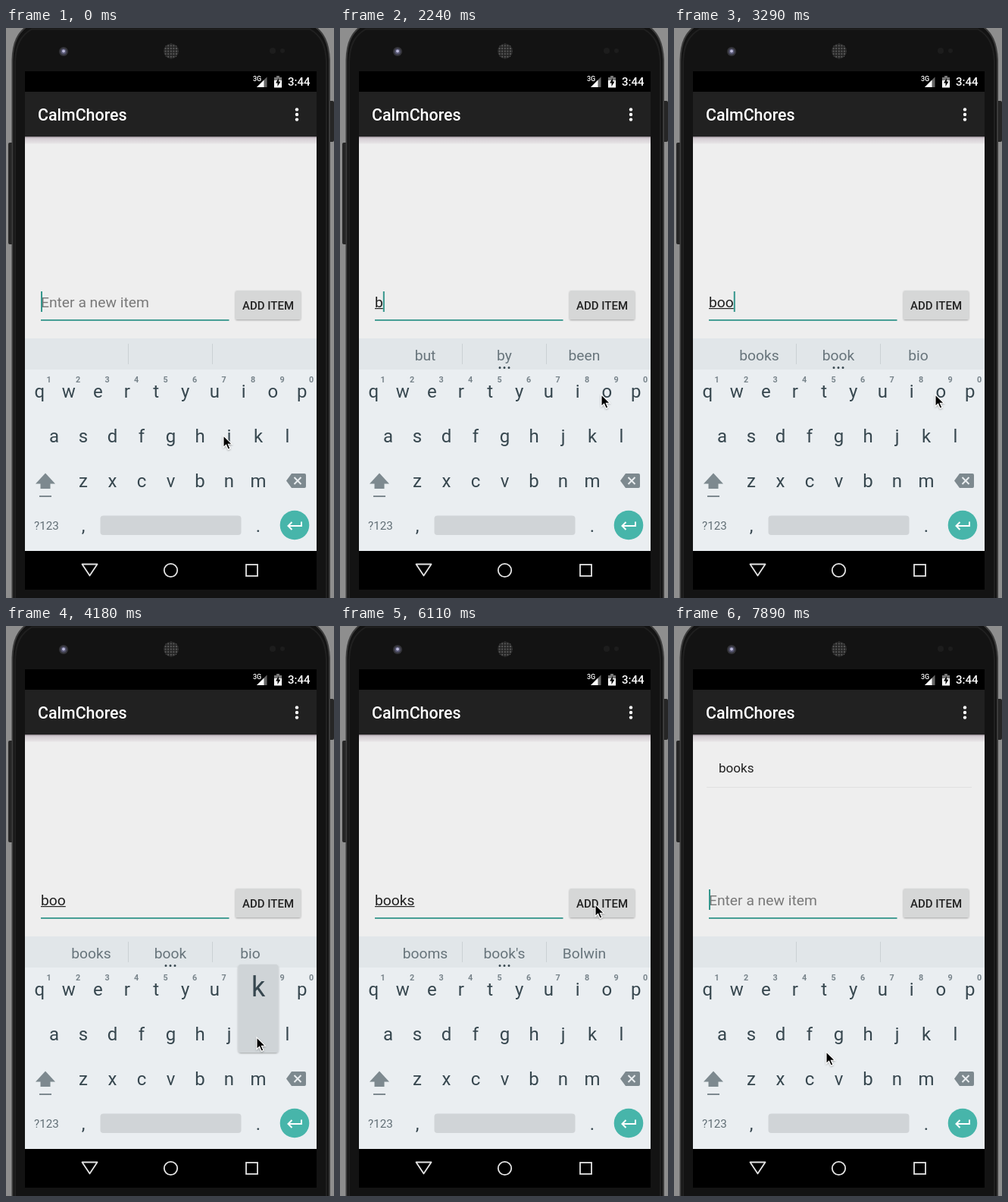
An HTML page that plays this animation: 433 by 751 pixels, repeating every 8 s.

```html
<!DOCTYPE html>
<html lang="en">
<head>
<meta charset="utf-8">
<title>To-do list</title>
<style>
  html, body { margin: 0; width: 100%; height: 100%; overflow: hidden; background: #8e8e8e; }
  svg { display: block; width: 433px; height: 751px; font-family: Roboto, sans-serif; }
  .medium { font-weight: 500; }
  .mid { text-anchor: middle; }
  .key { font-size: 24px; fill: #37474f; text-anchor: middle; }
  .digit { font-size: 10.8px; font-weight: 700; fill: #78848b; text-anchor: middle; }
  .word { font-size: 19.25px; fill: #67747b; text-anchor: middle; }
  .field { font-size: 19.25px; }
</style>
</head>
<body>
<svg viewBox="0 0 433 751">
  <defs>
    <linearGradient id="barShadow" x2="0" y2="1">
      <stop offset="0" stop-color="#8d838a"/>
      <stop offset=".22" stop-color="#d3ccd2"/>
      <stop offset=".85" stop-color="#e5e2e4"/>
      <stop offset="1" stop-color="#eee"/>
    </linearGradient>
    <pattern id="mesh" width="3.6" height="3.6" patternUnits="userSpaceOnUse">
      <circle cx="1.8" cy="1.8" r="1.15" fill="#5b5b5b"/>
    </pattern>
    <filter id="soft" x="-20%" y="-20%" width="140%" height="150%">
      <feDropShadow dx="0" dy="1" stdDeviation=".8" flood-opacity=".32"/>
    </filter>
  </defs>

  <!-- device -->
  <rect width="433" height="751" fill="#8e8e8e"/>
  <rect x="3" y="151" width="7" height="134" rx="2" fill="#262626"/>
  <rect x="426" y="96" width="7" height="54" rx="2" fill="#262626"/>
  <path d="M8.500 760V42C9 20 15 6 30 -4H405C420 6 426 20 427 42V760Z" fill="#131313" stroke="#3b3b3b" stroke-width="2"/>
  <path d="M12 760V44C13 23 19 10 34 1.500H401C416 10 422 23 423 44V760" fill="none" stroke="#202020" stroke-width="2"/>
  <circle cx="76" cy="31" r="6" fill="#35353b"/>
  <circle cx="76" cy="31" r="3.800" fill="#55556f"/>
  <circle cx="76" cy="30.500" r="2" fill="#b9b8d8"/>
  <circle cx="218" cy="30.500" r="10" fill="#242424"/>
  <circle cx="218" cy="30.500" r="10" fill="url(#mesh)"/>
  <circle cx="352" cy="30" r="4" fill="#1d1d1d"/>
  <circle cx="365" cy="30" r="3" fill="#1d1d1d"/>

  <!-- status bar and title -->
  <rect x="25" y="57" width="385" height="683"/>
  <g fill="#fff">
    <text class="medium" x="326" y="70" font-size="9">3G</text>
    <path d="M331 78L344.500 64.500V78Z" fill="#666"/>
    <path d="M331 78L340.500 68.500V78Z"/>
    <path d="M354 65h3v-2h4v2h3v5h-10Z" fill="#777"/>
    <path d="M354 69h10v9.500h-10Z"/>
    <path d="M360 66l-4 6.500h2.500v4.500l4-6.500h-2.500Z" fill="#000"/>
    <text class="medium" x="372" y="76" font-size="15">3:44</text>
    <rect x="25" y="84" width="385" height="59" fill="#212121"/>
    <text class="medium" x="42" y="122" font-size="21.400">CalmChores</text>
    <circle cx="384" cy="107.400" r="2.200"/>
    <circle cx="384" cy="114" r="2.200"/>
    <circle cx="384" cy="120.600" r="2.200"/>
  </g>

  <!-- content -->
  <rect x="25" y="143" width="385" height="267" fill="#eee"/>
  <rect x="25" y="143" width="385" height="10" fill="url(#barShadow)"/>
  <g id="listItem">
    <text x="59" y="193" font-size="17.100" fill="#212121">books</text>
    <path d="M43 212.500H393" stroke="#e0e0e0"/>
  </g>
  <text id="hint" class="field" x="46" y="368" fill="#787878">Enter a new item</text>
  <text id="typed" class="field" x="46" y="368" fill="#212121"></text>
  <rect id="composing" x="46" y="369" height="1.200" fill="#212121"/>
  <rect id="caret" y="347" width="2" height="27" fill="#35968c"/>
  <rect x="46" y="384" width="248.500" height="1.800" fill="#35968c"/>
  <rect id="button" x="303" y="346" width="86" height="38" rx="2" filter="url(#soft)"/>
  <text class="medium mid" x="346" y="371" font-size="15" fill="#212121">ADD ITEM</text>

  <!-- keyboard -->
  <rect x="25" y="409" width="385" height="42" fill="#e1e6e9"/>
  <rect x="25" y="450" width="385" height="239" fill="#eaeef1"/>
  <path d="M161.500 416V443M272.500 416V443" stroke="#cbd1d4"/>
  <g id="words">
    <text class="word" x="112.500" y="438"></text>
    <text class="word" x="217" y="438"></text>
    <text class="word" x="322.500" y="438"></text>
    <path d="M211 447.500h0M217 447.500h0M223 447.500h0" stroke="#37474f" stroke-width="3" stroke-linecap="round"/>
  </g>
  <g id="keys"></g>
  <g fill="#7d898f">
    <path d="M52 586.500L65 600.500H58.500V607H45.500V600.500H39Z"/>
    <rect x="44" y="616" width="16" height="2"/>
    <path d="M377 587H394Q396 587 396 589V604Q396 606 394 606H377L370 596.500Z"/>
    <path d="M380.500 592l9 9m0-9l-9 9" stroke="#eaeef1" stroke-width="2"/>
  </g>
  <text class="mid" x="53.500" y="661" font-size="15.200" fill="#626f76">?123</text>
  <text class="key" x="102" y="664">,</text>
  <text class="key" x="333" y="664">.</text>
  <rect x="124.500" y="642.500" width="186" height="25.500" rx="4" fill="#d0d4d7"/>
  <circle cx="381" cy="655" r="19.300" fill="#47b5aa"/>
  <path d="M390 650.500V656H373M377.500 651L372.500 656L377.500 661" fill="none" stroke="#fff" stroke-width="2"/>
  <g fill="none" stroke="#e4e4e4" stroke-width="1.800">
    <path d="M100.500 706.500H120.500L110.500 721.500Z" stroke-linejoin="round"/>
    <circle cx="217.500" cy="714.500" r="8.700"/>
    <rect x="317" y="707" width="15" height="15"/>
  </g>

  <g id="popup">
    <rect x="-26.500" y="-100" width="53" height="116" rx="4" fill="#cfd4d7" filter="url(#soft)"/>
    <text class="key" y="-58.500" style="font-size:36px"></text>
  </g>
  <path id="pointer" d="M0 0V15.500L3.600 12.200L6.200 18.200L8.900 17L6.300 11.200H11.200Z" stroke="#fff" stroke-width="1.100" filter="url(#soft)"/>
</svg>
<script>
const LOOP = 8000, TICK = 148.86;
const $ = id => document.getElementById(id);

// Tables below are keyed by tick.
const typing = [[0, ""], [8, "b"], [17, "bo"], [22, "boo"], [29, "book"], [36, "books"], [44, ""]];
const suggestions = [
  [0, ""], [9, "but by been"], [17, "boy bo box"], [22, "books book bio"],
  [30, "boom books boon"], [36, "booms book's Bolwin"], [44, ""]
];
const presses = [
  [0, ""], [7, "b"], [9, ""], [16, "o"], [17, ""], [21, "o"], [22, ""],
  [28, "k"], [30, ""], [35, "s"], [36, ""]
];
const buttonColors = [[0, "#d6d7d7"], [43, "#bfc0c0"], [44, "#c7c8c8"], [45, "#cfd0d0"], [46, "#d6d7d7"]];
const pointerPath = [
  [0, 287, 537], [4, 304, 612], [7, 253, 601], [9, 253, 601], [13, 345, 483],
  [22, 345, 483], [28, 331, 542], [30, 331, 542], [33, 99, 539], [36, 99, 539],
  [41, 337, 367], [47, 337, 367], [49, 206, 525], [50, 206, 525], [51, 203, 583], [53, 201, 561]
];

const keys = {};
function addText(cls, x, y, text) {
  const node = document.createElementNS("http://www.w3.org/2000/svg", "text");
  node.setAttribute("class", cls);
  node.setAttribute("x", x);
  node.setAttribute("y", y);
  node.textContent = text;
  $("keys").append(node);
}
[["qwertyuiop", 44.25, 487], ["asdfghjkl", 63.5, 546], ["zxcvbnm", 102, 605]].forEach(([row, left, y]) =>
  [...row].forEach((letter, i) => {
    const x = left + 38.5 * i;
    keys[letter] = [x, y];
    addText("key", x, y, letter);
  }));
[..."1234567890"].forEach((digit, i) => addText("digit", 56.5 + 38.5 * i, 467, digit));

const latest = (table, tick) => table.findLast(row => row[0] <= tick);
const show = (node, on) => node.setAttribute("visibility", on ? "visible" : "hidden");

function pointerAt(tick) {
  const from = latest(pointerPath, tick);
  const to = pointerPath[pointerPath.indexOf(from) + 1] || from;
  const p = (tick - from[0]) / (to[0] - from[0] || 1);
  const eased = p * p * (3 - 2 * p);
  return [1, 2].map(i => from[i] + (to[i] - from[i]) * eased);
}

function draw(tick) {
  const [typedAt, text] = latest(typing, tick);
  $("typed").textContent = text;
  const width = text ? $("typed").getComputedTextLength() : 0;
  $("composing").setAttribute("width", width);
  $("caret").setAttribute("x", 46 + width);
  show($("caret"), (tick - typedAt) * TICK % 1000 < 500);
  show($("hint"), !text);
  show($("listItem"), tick >= 44);

  const words = latest(suggestions, tick)[1];
  show($("words"), words);
  $("words").querySelectorAll("text").forEach((node, i) => node.textContent = words.split(" ")[i] || "");

  const letter = latest(presses, tick)[1];
  show($("popup"), letter);
  if (letter) {
    $("popup").setAttribute("transform", `translate(${keys[letter]})`);
    $("popup").querySelector("text").textContent = letter;
  }
  $("button").setAttribute("fill", latest(buttonColors, tick)[1]);
  $("pointer").setAttribute("transform", `translate(${pointerAt(tick)})`);
}

let shown = -1;
function frame() {
  const tick = Math.floor(performance.now() % LOOP / TICK);
  if (tick !== shown) draw(shown = tick);
  requestAnimationFrame(frame);
}
frame();
</script>
</body>
</html>
```
